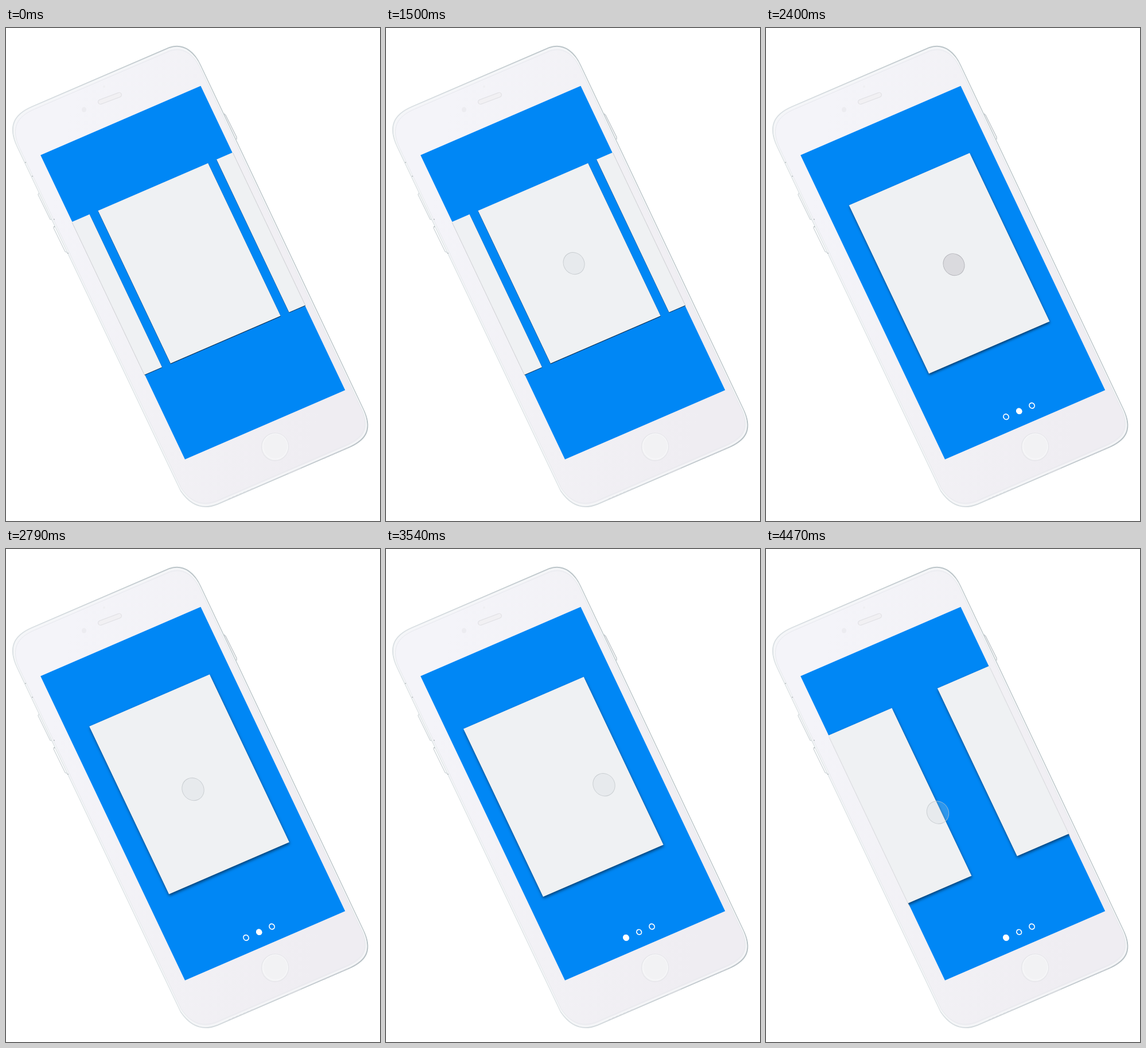
Recreate the animation shown at these times as an HTML page with a canvas. Size 652 by 858 pixels, loop 4500 ms.

```html
<!DOCTYPE html>
<html lang="en">
<head>
<meta charset="utf-8">
<title>Card pager</title>
<style>
html, body { margin: 0; width: 100%; height: 100%; overflow: hidden; background: #fff; }
canvas { display: block; width: 652px; height: 858px; }
</style>
</head>
<body>
<canvas id="stage" width="652" height="858"></canvas>
<script>
const ctx = document.getElementById('stage').getContext('2d');
const LOOP = 4500, STEP = 30;
const W = 375, H = 667;

// Screen units to stage pixels: a skewed plane
const PLANE = [279.2 / W, -120.5 / W, 251.8 / H, 529.5 / H, 60.2, 221.2];

const clamp = x => Math.max(0, Math.min(1, x));
const mix = (a, b, p) => a + (b - a) * p;
const span = (t, a, b) => clamp((t - a) / (b - a));
const smooth = p => p * p * (3 - 2 * p);
const outCubic = p => 1 - (1 - p) ** 3;
const settle = (ms, tau) => ms <= 0 ? 0 : 1 - Math.exp(-ms / tau);

function spring(ms) {
  if (ms <= 0) return 0;
  const s = ms / 1000, w = 31, d = 11;
  return 1 - Math.exp(-d * s) * (Math.cos(w * s) + d / w * Math.sin(w * s));
}

function glide(ms) {
  const x = Math.max(0, ms) * 0.0167;
  return 1 - (1 + x) * Math.exp(-x);
}

function line(pts, color, width) {
  ctx.beginPath();
  pts.forEach(([x, y]) => ctx.lineTo(x, y));
  ctx.strokeStyle = color;
  ctx.lineWidth = width;
  ctx.stroke();
}

function oval(x, y, rx, ry, fill, stroke, width = 1) {
  ctx.beginPath();
  ctx.ellipse(x, y, rx, ry, 0, 0, Math.PI * 2);
  if (fill) { ctx.fillStyle = fill; ctx.fill(); }
  if (stroke) { ctx.strokeStyle = stroke; ctx.lineWidth = width; ctx.stroke(); }
}

const shell = new Path2D(
  'M45 137 L285 34 C312 25 330 45 339 65 L622 662 C640 698 628 716 600 729' +
  'L368 829 C340 840 320 828 305 806 L20 207 C2 170 15 150 45 137Z');

function insetShell(k, color, width) {
  ctx.save();
  ctx.translate(321.5, 433);
  ctx.scale(k, k);
  ctx.translate(-321.5, -433);
  ctx.strokeStyle = color;
  ctx.lineWidth = width;
  ctx.stroke(shell);
  ctx.restore();
}

function drawPhone() {
  const edge = '#d3d9dc';
  line([[34, 234], [36, 240], [46, 259]], edge, 1.5);
  line([[58, 286], [56, 290], [77, 333], [84, 334]], edge, 1.5);
  line([[85, 344], [83, 348], [103, 389], [109, 392]], edge, 1.5);
  line([[380, 149], [383, 152], [402, 190], [402, 194]], '#c3c9cd', 1.5);

  const body = ctx.createLinearGradient(60, 400, 580, 500);
  body.addColorStop(0, '#f4f4f9');
  body.addColorStop(0.5, '#f2f1f5');
  body.addColorStop(1, '#efedf2');
  ctx.fillStyle = body;
  ctx.fill(shell);

  const rim = ctx.createLinearGradient(170, 470, 480, 350);
  rim.addColorStop(0, '#dae0e3');
  rim.addColorStop(1, '#b6c0c4');
  insetShell(1, rim, 1.9);
  insetShell(0.993, '#f5f7f8', 2);
  insetShell(0.985, '#e7e9ed', 1);

  for (const [x, y] of [[34, 234], [46, 258], [84, 333], [84, 346], [108, 392]])
    oval(x, y, 1, 1, '#b4babe');

  ctx.save();
  ctx.translate(181, 122.5);
  ctx.rotate(-0.36);
  ctx.beginPath();
  ctx.roundRect(-21.5, -4, 43, 8, 4);
  ctx.fillStyle = '#f1f0f3';
  ctx.strokeStyle = '#e2e2e6';
  ctx.lineWidth = 1.2;
  ctx.fill();
  ctx.stroke();
  ctx.restore();
  oval(136, 142, 4, 4.5, '#ececf0');
  oval(171, 102, 2, 2, '#efeff2');

  oval(469, 729, 23.5, 24, '#f2f2f4', '#e6e6ea', 1.3);
  oval(469.5, 728, 21.5, 22, null, '#f8f8fa', 1.2);

  ctx.setLineDash([4, 3]);
  line([[388, 820], [430, 802]], '#d4d8dc', 2);
  line([[554, 749], [600, 729]], '#cbd0d5', 2);
  ctx.setLineDash([]);
  line([[492, 775.5], [514, 766]], '#d9dce0', 2);
}

function drawCards(t) {
  const open = spring(t - 2105);
  const lift = settle(t - 2105, 150);
  const w = mix(257.6, 281.7, open), h = mix(335, 368, open);
  const pitch = mix(277.5, 388.3, open);

  const drag = 64 * smooth(span(t, 3130, 3240));
  const back = 182 * smooth(span(t, 4245, 4470));
  const shift = drag + (pitch - drag) * glide(t - 3244) - back;
  const top = 313.8 - h / 2;

  for (let i = -1; i <= 1; i++) {
    const left = 189.2 + i * pitch + shift - w / 2;
    if (left > W + 10 || left + w < -10) continue;
    ctx.shadowColor = `rgba(0,0,0,${mix(0.75, 0.52, lift)})`;
    ctx.shadowBlur = mix(1, 5, lift);
    ctx.shadowOffsetX = mix(0.2, 0.8, lift);
    ctx.shadowOffsetY = mix(0.8, 2.8, lift);
    ctx.fillStyle = '#eff1f3';
    ctx.fillRect(left, top, w, h);
    ctx.shadowColor = 'transparent';
    ctx.fillStyle = '#e7e9ec';
    for (const x of [0, W])
      if (left < x && x < left + w) ctx.fillRect(x - 0.6, top, 1.2, h);
  }
}

function drawDots(t) {
  const show = settle(t - 2160, 43);
  if (!show) return;
  const y = mix(673, 637.5, show);
  const xs = [158, 188.5, 218.5];
  ctx.globalAlpha = show;
  xs.forEach((x, i) => {
    const r = i === 1 ? 5.1 : 5.5;
    oval(x, y, r, r, null, '#fff', 2.1);
  });
  const lead = mix(xs[1], xs[0], settle(t - 3210, 20));
  const tail = mix(xs[1], xs[0], settle(t - 3240, 41));
  ctx.lineCap = 'round';
  line([[lead, y], [tail + 0.01, y]], '#fff', 12.6);
  ctx.lineCap = 'butt';
  ctx.globalAlpha = 1;
}

// Finger position in stage pixels, or null while lifted
function finger(t) {
  if (t < 270 || (t >= 4110 && t < 4260)) return null;
  if (t >= 4260) {
    const p = smooth(span(t, 4245, 4470));
    return [mix(434, 299.5, p), mix(400, 458.5, p)];
  }
  if (t < 820) {
    const p = span(t, 270, 330);
    return [mix(315, 323.3, p), mix(124.5, 147.7, p)];
  }
  if (t < 1360) {
    const p = smooth(span(t, 820, 1360));
    return [mix(323.3, 328, p) - 34 * p * (1 - p), mix(147.7, 401, p)];
  }
  const sink = outCubic(span(t, 1360, 1690));
  const free = outCubic(span(t, 2640, 2790));
  const swipe = smooth(span(t, 3130, 3240));
  return [
    mix(mix(mix(328, 327.5, sink), 326, free), 380, swipe),
    mix(mix(mix(401, 411.7, sink), 418, free), 410.2, swipe)
  ];
}

function drawFinger(t) {
  const pos = finger(t);
  if (!pos) return;
  const free = span(t, 2640, 2760);
  const press = span(t, 2100, 2160) * (1 - free);
  const r = mix(22.2, 23, free);
  const tone = (a, b) => Math.round(mix(a, b, press));
  ctx.save();
  ctx.transform(PLANE[0], PLANE[1], PLANE[2], PLANE[3], pos[0], pos[1]);
  oval(0, 0, r, r,
    `rgba(${tone(200, 140)},${tone(210, 138)},${tone(212, 148)},0.22)`,
    `rgba(${tone(192, 168)},${tone(197, 168)},${tone(200, 174)},0.8)`, 1.1);
  ctx.restore();
}

function draw(t) {
  ctx.clearRect(0, 0, 652, 858);
  drawPhone();

  ctx.save();
  ctx.transform(...PLANE);
  ctx.fillStyle = '#0087f5';
  ctx.fillRect(0, 0, W, H);
  // A slightly wider clip lets cards cover the soft screen edge
  ctx.beginPath();
  ctx.rect(-1, 0, W + 2, H);
  ctx.clip();
  drawCards(t);
  drawDots(t);
  ctx.restore();

  drawFinger(t);
}

const start = performance.now();
function tick() {
  const t = (performance.now() - start) % LOOP;
  draw(Math.floor(t / STEP) * STEP);
  requestAnimationFrame(tick);
}
tick();
</script>
</body>
</html>
```
